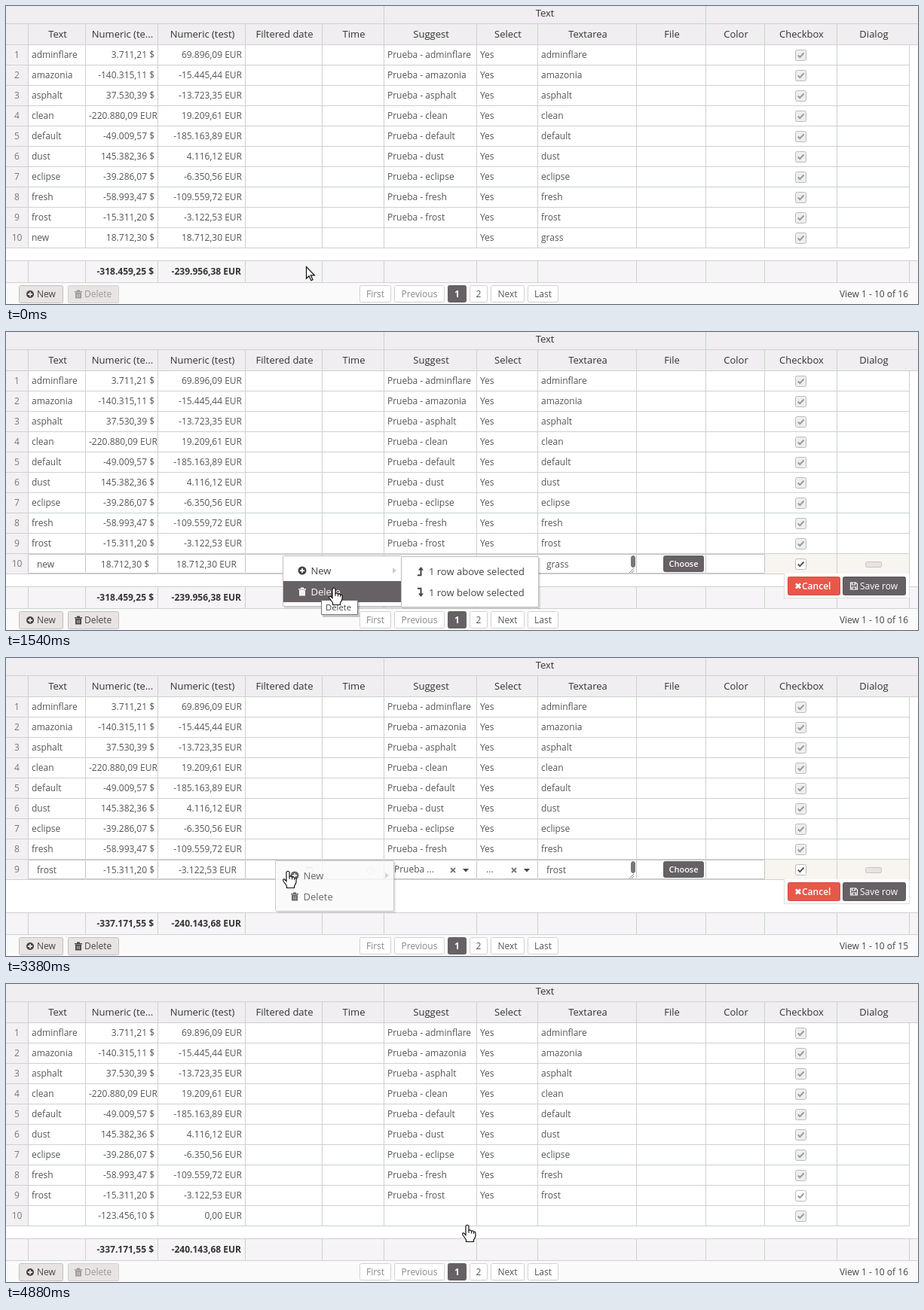
These frames come from a looping animation (1210x396 px, 4.9 s). An HTML page with a canvas:

```html
<!DOCTYPE html>
<html lang="en">
<head>
<meta charset="utf-8">
<title>Editable grid</title>
<style>
html, body { margin: 0; height: 100%; overflow: hidden; background: #fff; }
canvas { display: block; }
</style>
</head>
<body>
<canvas id="stage" width="1210" height="396"></canvas>
<script>
const g = document.getElementById('stage').getContext('2d');
const LOOP = 4900, ROW = 27, TOP = 51;
const LINE = '#cbd3cb', HEAD = '#f0eef0', DARK = '#666164', INK = '#555', BLACK = '#333', EDIT = '#f8f4ef';
const X = [0, 29, 105, 201, 317, 419, 501, 624, 705, 836, 928, 1006, 1102, 1198];
const HEADS = ['', 'Text', 'Numeric (te...', 'Numeric (test)', 'Filtered date', 'Time', 'Suggest', 'Select',
  'Textarea', 'File', 'Color', 'Checkbox', 'Dialog'];
const DATA = [
  ['adminflare', '3.711,21 $', '69.896,09 EUR'],
  ['amazonia', '-140.315,11 $', '-15.445,44 EUR'],
  ['asphalt', '37.530,39 $', '-13.723,35 EUR'],
  ['clean', '-220.880,09 EUR', '19.209,61 EUR'],
  ['default', '-49.009,57 $', '-185.163,89 EUR'],
  ['dust', '145.382,36 $', '4.116,12 EUR'],
  ['eclipse', '-39.286,07 $', '-6.350,56 EUR'],
  ['fresh', '-58.993,47 $', '-109.559,72 EUR'],
  ['frost', '-15.311,20 $', '-3.122,53 EUR']
].map(([name, a, b]) => ({ name, a, b, suggest: 'Prueba - ' + name, select: 'Yes', area: name }));
const OLD = { name: 'new', a: '18.712,30 $', b: '18.712,30 EUR', suggest: '', select: 'Yes', area: 'grass' };
const ADDED = { name: '', a: '-123.456,10 $', b: '0,00 EUR', suggest: '', select: '', area: '' };

// Pointer hot spot: time, x, y
const PATH = [
  [380, 398, 346], [580, 385, 311], [940, 385, 311], [1200, 450, 317], [1460, 419, 335], [1540, 435, 340],
  [1660, 435, 340], [1820, 437, 342], [2020, 437, 342], [2380, 434, 345], [2540, 434, 345], [2760, 404, 316],
  [2980, 374, 285], [3240, 374, 285], [3380, 374, 283], [3620, 470, 289], [3760, 470, 289], [3940, 536, 297],
  [4120, 575, 318], [4380, 575, 318], [4500, 604, 316], [4680, 604, 316], [4880, 612, 320]
];
const MENUS = [
  { x: 367, y: 297, open: 940, close: 2020, subOpen: 1120, subClose: 1700 },
  { x: 357, y: 269, open: 3340, close: 4380, subOpen: 3480, subClose: 4500 }
];
const DELETED = 2200, INSERTED = 4680;

const clamp = v => Math.max(0, Math.min(1, v));
const within = (t, a, b) => t >= a && t < b;

function pointer(t) {
  if (t <= PATH[0][0]) return { x: PATH[0][1], y: PATH[0][2] };
  const i = PATH.findIndex(p => p[0] > t);
  if (i < 0) return { x: 612, y: 320 };
  const [a, b] = [PATH[i - 1], PATH[i]];
  const k = (t - a[0]) / (b[0] - a[0]);
  return { x: Math.round(a[1] + (b[1] - a[1]) * k), y: Math.round(a[2] + (b[2] - a[2]) * k) };
}

function rect(x, y, w, h, color) {
  g.fillStyle = color;
  g.fillRect(x, y, w, h);
}

function box(x, y, w, h, fill, border, r = 2) {
  g.beginPath();
  g.roundRect(x + .5, y + .5, w - 1, h - 1, r);
  g.fillStyle = fill;
  g.fill();
  g.lineWidth = 1;
  g.strokeStyle = border;
  g.stroke();
}

function text(s, x, y, { size = 12, weight = 400, color = INK, align = 'left' } = {}) {
  g.font = `${weight} ${size}px "Open Sans", sans-serif`;
  g.textAlign = align;
  g.fillStyle = color;
  g.fillText(s, x, y);
}

// Icons are centred on x, y
function shape(d, x, y, { fill, stroke, width = 1.5, flip = 1 } = {}) {
  g.save();
  g.translate(x, y);
  g.scale(1, flip);
  const p = new Path2D(d);
  if (fill) { g.fillStyle = fill; g.fill(p); }
  if (stroke) { g.lineWidth = width; g.strokeStyle = stroke; g.stroke(p); }
  g.restore();
}

function plusIcon(x, y, color, cross, r = 5) {
  g.beginPath();
  g.arc(x, y, r, 0, 7);
  g.fillStyle = color;
  g.fill();
  shape('M-3 0H3M0 -3V3', x, y, { stroke: cross, width: 1.8 });
}

function trashIcon(x, y, color) {
  shape('M-5 -4H5V-2.6H-5ZM-2 -5.5H2V-4H-2ZM-4 -2H4V5.5H-4Z', x, y, { fill: color });
  shape('M-1.7 -.5V4M0 -.5V4M1.7 -.5V4', x, y, { stroke: '#ddd', width: .7 });
}

const crossIcon = (x, y, color, width) => shape('M-3 -3L3 3M3 -3L-3 3', x, y, { stroke: color, width });
const caret = (x, y) => shape('M-4 -2H4L0 2.5Z', x, y, { fill: '#444' });

function levelIcon(x, y, flip) {
  shape('M-4 5.2H.5V-2', x, y, { stroke: '#444', width: 2, flip });
  shape('M-3 -1.5L.5 -6L4 -1.5Z', x, y, { fill: '#444', flip });
}

function checkbox(cy, bg, color) {
  box(1047, cy - 8, 15, 15, bg, '#bbb');
  shape('M-3.7 0L-1.2 2.6L4 -3', 1054.5, cy - .5, { stroke: color, width: 2 });
}

function header() {
  rect(0, 0, 1210, 51, HEAD);
  rect(0, 23, 1210, 1, LINE);
  rect(0, 51, 1210, 1, LINE);
  X.slice(1, 13).forEach(x => rect(x, 24, 1, 28, LINE));
  [501, 928].forEach(x => rect(x, 0, 1, 23, LINE));
  text('Text', 715, 14, { size: 13, color: BLACK, align: 'center' });
  HEADS.forEach((s, i) => text(s, (X[i] + X[i + 1]) / 2 + 1.5, 42, { size: 13, color: BLACK, align: 'center' }));
}

function amount(s, right) {
  g.font = '400 12px "Open Sans", sans-serif';
  const wide = right === 197 && g.measureText(s).width > 88;
  text(s, wide ? 110 : right, g.baseY, { align: wide ? 'left' : 'right' });
}

function row(d, i, mode, lightCheck) {
  const y = TOP + ROW * i, base = g.baseY = y + 18;
  rect(0, y + 1, 29, 26, mode === 'hover' ? '#e9e4df' : '#f3f0f3');
  if (mode) rect(29, y + 1, 1169, 26, mode === 'hover' ? '#eae6e0' : EDIT);
  rect(0, y + ROW, 1199, 1, LINE);
  X.slice(1).forEach(x => rect(x, y, 1, ROW + 1, LINE));
  text(i + 1, 14.5, base, { align: 'center', color: '#777' });
  if (mode === 'edit') return editor(d, y);
  text(d.name, 34, base);
  amount(d.a, 197);
  amount(d.b, 313);
  text(d.suggest, 506, base);
  text(d.select, 629, base);
  text(d.area, 710, base);
  checkbox(y + 15, lightCheck ? '#fff' : '#eee', '#999');
}

function editor(d, y) {
  const base = y + 19, mid = y + 15;
  for (let i = 1; i < 11; i++) box(X[i], y + 1, X[i + 1] - X[i] + 1, 26, '#fff', '#c4c4c4', 1);
  text(d.name, 41, base);
  text(d.a, d === OLD ? 190 : 197, base, { align: 'right' });
  text(d.b, 306, base, { align: 'right' });
  box(397, mid - 5, 10, 10, '#fff', '#ccc', 1);
  rect(398, mid - 4, 8, 2, '#ccc');
  shape('M5 0A5 5 0 1 1 -5 0A5 5 0 1 1 5 0M0 -3V0H2.5', 484, mid, { stroke: '#ccc', width: 1 });
  if (d.suggest) {
    text('Prueba ...', 515, base - 1);
    crossIcon(593, mid, '#777', 1.8);
  }
  caret(610, mid);
  text('...', 637, base - 1);
  crossIcon(674, mid, '#777', 1.8);
  caret(691, mid);
  text(d.area, 717, base);
  box(829, y + 3, 6, 16, '#777', '#777', 3);
  shape('M-3 3L3 -3M0 3L3 0', 830, y + 23, { stroke: '#888', width: 1 });
  box(872, y + 3, 54, 22, DARK, DARK);
  text('Choose', 899, y + 18, { size: 11, weight: 600, color: '#fff', align: 'center' });
  checkbox(mid, '#fff', '#555');
  box(1140, y + 11, 22, 8, '#e8e3e3', '#c9c4c4');
}

function actions(y) {
  rect(1032, y, 167, 33, '#ddd');
  rect(1033, y, 165, 32, '#fff');
  box(1037, y + 4, 70, 25, '#e8584a', '#d9483b');
  crossIcon(1051, y + 16.5, '#fff', 2.6);
  text('Cancel', 1056, y + 21, { weight: 600, color: '#fff' });
  box(1110, y + 4, 84, 25, DARK, '#5a5558');
  shape('M-4.5 -4.5H2.5L4.5 -2.5V4.5H-4.5ZM-2.5 -4.5V-1.5H1.5V-4.5M-2.5 4.5V1.5H2.5V4.5', 1125, y + 16.5,
    { stroke: '#fff', width: 1.2 });
  text('Save row', 1133, y + 21, { color: '#fff' });
}

function footer(t, editing) {
  const changed = t >= DELETED, bold = { weight: 700, color: BLACK, align: 'right' };
  rect(0, 338, 1210, 29, '#f6f4f6');
  rect(0, 338, 1210, 1, LINE);
  rect(0, 367, 1210, 1, LINE);
  rect(0, 368, 1210, 28, '#fafafa');
  X.slice(1).forEach(x => rect(x, 339, 1, 28, LINE));
  text(changed ? '-337.171,55 $' : '-318.459,25 $', 196, 357, bold);
  text(changed ? '-240.143,68 EUR' : '-239.956,38 EUR', 312, 357, bold);

  const color = editing ? '#444' : '#999', fill = '#e8e4e3';
  box(17, 371, 59, 24, fill, '#c4c0c0');
  plusIcon(32, 383, '#444', fill);
  text('New', 41, 387, { color: '#444' });
  box(82, 371, 68, 24, fill, editing ? '#c4c0c0' : '#d4d0d0');
  trashIcon(96, 383, color);
  text('Delete', 104, 387, { color });

  [['First', 469, 42], ['Previous', 515, 67], ['1', 586, 25], ['2', 615, 24], ['Next', 643, 45], ['Last', 692, 41]]
    .forEach(([s, x, w], i) => {
      const on = s === '1';
      box(x, 371, w, 23, on ? DARK : '#fff', on ? DARK : '#d2d2d2');
      text(s, x + w / 2, 387, { align: 'center', weight: on ? 700 : 400, color: on ? '#fff' : i < 2 ? '#888' : INK });
    });
  text(`View 1 - 10 of ${within(t, DELETED, INSERTED) ? 15 : 16}`, 1197, 387, { align: 'right', color: '#444' });
}

function panel(x, y, w, h) {
  rect(x + 2, y + 2, w, h, 'rgba(0,0,0,.12)');
  box(x, y, w, h, '#fff', '#bdbdbd', 1);
}

function menu(m, t, p) {
  const { x, y } = m, sub = within(t, m.subOpen, m.subClose), sx = x + 157;
  const live = t >= m.open + 60;
  const inSub = sub && p.x > sx;
  const hot = !live ? -1 : inSub || p.y < y + 34 ? 0 : 1;
  g.globalAlpha = t < m.close ? clamp((t - m.open) / 50) : clamp(1 - (t - m.close) / 120);
  panel(x, y, 158, 68);
  ['New', 'Delete'].forEach((s, i) => {
    const cy = y + 20 + 28 * i, on = hot === i, color = on ? '#fff' : '#444';
    if (on) rect(x + 1, cy - 14, 156, 28, DARK);
    if (i) trashIcon(x + 26, cy, color);
    else {
      plusIcon(x + 26, cy, color, on ? DARK : '#fff', 5.5);
      shape('M-2 -4L3 0L-2 4Z', x + 148, cy, { fill: on ? '#fff' : '#ccc' });
    }
    text(s, x + 37.5, cy + 5, { size: 13, color });
  });
  if (sub) {
    panel(sx, y + 1, 183, 68);
    ['above', 'below'].forEach((s, i) => {
      const cy = y + 21 + 28 * i;
      const on = inSub && p.x > 540 && Math.abs(p.y - cy) < 14;
      if (on) rect(sx + 1, cy - 14, 181, 28, DARK);
      levelIcon(sx + 26, cy, i ? -1 : 1);
      text(`1 row ${s} selected`, sx + 37, cy + 5, { size: 13, color: on ? '#fff' : '#444' });
    });
  }
  g.globalAlpha = 1;
}

function tooltip() {
  rect(420, 359, 49, 20, 'rgba(0,0,0,.2)');
  box(418, 356, 49, 20, '#fff', '#767676', 0);
  text('Delete', 424, 370, { size: 11.3, color: '#444' });
}

function cursor(p, hand) {
  const d = hand
    ? 'M-2 1.5Q0 -1 2 1.5V7.5Q4 6 5.5 8.5Q7.5 7 8.5 9.5Q11 8.5 11 11.5V15Q10 18 8.5 20V22.5H-1.5V20Q-4 16 -6 13.5Q-7 10 -4.5 11L-2 13.5Z'
    : 'M.5 .5V16L4 12.7L6.8 18.8L9 17.8L6.3 11.8H11.3Z';
  shape(d, p.x, p.y, { fill: '#fff', stroke: '#111', width: 1.2 });
  if (hand) shape('M2 7.5V11M5.5 8.5V11.5M8.5 9.5V12', p.x, p.y, { stroke: '#111', width: 1 });
}

function draw(t) {
  const p = pointer(t);
  const rows = t < DELETED ? [...DATA, OLD] : t < INSERTED ? DATA : [...DATA, ADDED];
  const editing = within(t, 940, DELETED) ? 9 : within(t, 3240, INSERTED) ? 8 : -1;
  const open = MENUS.find(m => within(t, m.open, m.close + 120));
  const bottom = TOP + ROW * rows.length;
  const hover = editing < 0 && p.y < bottom - 1 ? Math.floor((p.y - TOP) / ROW) : -1;

  rect(0, 0, 1210, 396, '#fff');
  rows.forEach((d, i) => row(d, i, i === editing ? 'edit' : i === hover ? 'hover' : '', i === 8 && t >= INSERTED));
  header();
  footer(t, editing >= 0);
  if (editing >= 0) actions(TOP + ROW * (editing + 1));
  if (open) menu(open, t, p);
  if (within(t, 1480, 1700)) tooltip();
  cursor(p, p.y < bottom || open && t < open.close);
}

function tick(now) {
  draw(now % LOOP);
  requestAnimationFrame(tick);
}
requestAnimationFrame(tick);
</script>
</body>
</html>
```
